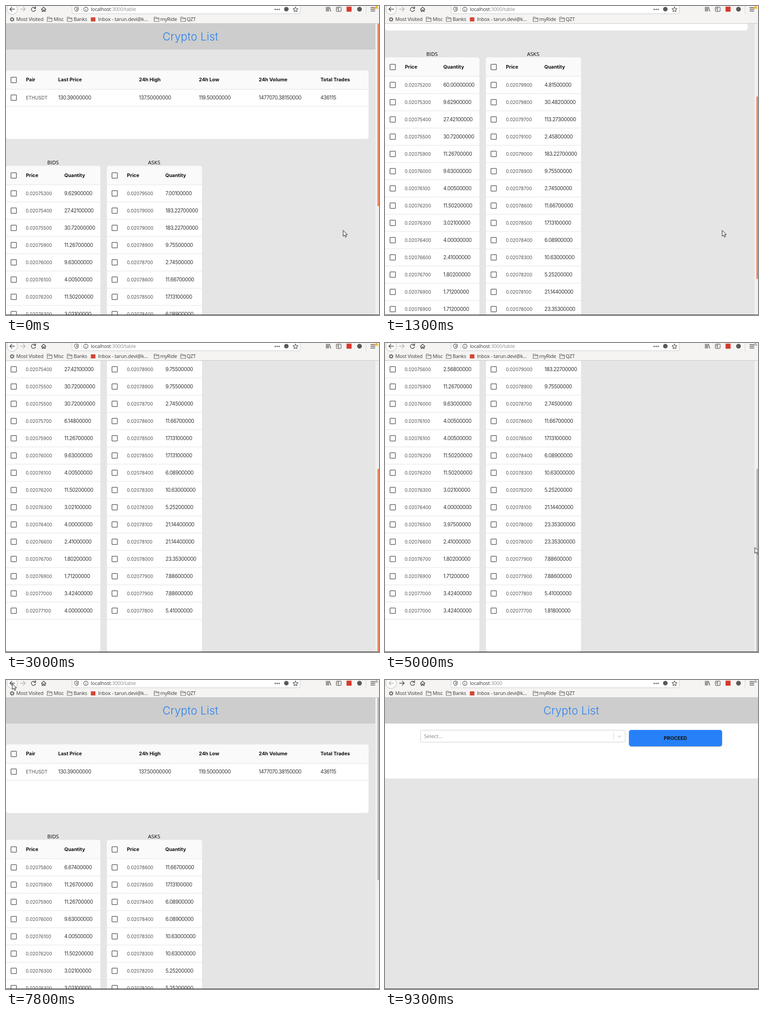
An HTML page for the animation above (9.4 s loop, 822 by 681 pixels).

```html
<!DOCTYPE html>
<html lang="en">
<head>
<meta charset="utf-8">
<title>Crypto List</title>
<style>
  html, body { margin: 0; width: 100%; height: 100%; overflow: hidden; background: #e5e5e5; }
  #stage { display: block; width: 822px; height: 681px; }
  text { white-space: pre; }
  .ui { font: 11px "Open Sans", "Noto Sans", sans-serif; letter-spacing: -.23px; fill: #3a3a3a; }
  .dim { fill: #8d8d8d; }
  .label { font: 11.5px "Open Sans", "Noto Sans", sans-serif; fill: #000; }
  .title { font: 300 24px Inter, sans-serif; letter-spacing: .2px; fill: #2a80f0; text-anchor: middle; }
  .head { font: 700 10.8px Inter, sans-serif; fill: #111; }
  .key { font: 10px Inter, sans-serif; letter-spacing: .04px; fill: #4c4c4c; }
  .val { font: 11.2px Inter, sans-serif; letter-spacing: -.4px; fill: #333; }
  .line { fill: #e1e1e1; }
  .box { fill: none; stroke: #666; stroke-width: 1.5; }
  .icon { fill: none; stroke: #4a4a4a; stroke-width: 1.4; stroke-linecap: round; stroke-linejoin: round; }
  .off { opacity: .38; }
</style>
</head>
<body>
<svg id="stage" viewBox="0 0 822 681">
  <rect width="822" height="681" fill="#e5e5e5"/>

  <svg id="table" y="39" width="822" height="642" viewBox="0 39 822 642">
    <g id="scroll">
      <rect y="38" width="814" height="58" fill="#cdcdcd"/>
      <text class="title" x="406.5" y="76">Crypto List</text>
      <g id="summary"></g>
      <text class="label" x="91" y="349">BIDS</text>
      <text class="label" x="313" y="349">ASKS</text>
      <g id="frames"></g>
      <g id="bids"></g>
      <g id="asks" transform="translate(223)"></g>
    </g>
    <rect x="814" y="39" width="8" height="642" fill="#f1f0ef"/>
    <rect id="thumb" x="818.5" y="39" width="3.5" height="402"/>
  </svg>

  <g id="picker">
    <rect y="39" width="822" height="57" fill="#cdcdcd"/>
    <text class="title" x="410.5" y="76">Crypto List</text>
    <path d="M0 96H822V212Q822 217 817 217H5Q0 217 0 212Z" fill="#fff"/>
    <rect x="78.5" y="110.5" width="451" height="26.5" rx="3" fill="#fff" stroke="#ccc"/>
    <text class="label" x="86" y="128" style="fill:#808080">Select...</text>
    <rect x="503" y="116" width="1" height="15" fill="#ccc"/>
    <path d="M513 122.5l3.5 3.5 3.5-3.5" fill="none" stroke="#ccc" stroke-width="1.6"/>
    <rect x="538" y="112" width="205" height="36" rx="5" fill="#000" opacity=".1"/>
    <rect x="538" y="111" width="205" height="36" rx="5" fill="#000" opacity=".2"/>
    <rect x="537.5" y="110" width="205.5" height="36" rx="5" fill="#2780f8"/>
    <text class="head" x="640" y="132" text-anchor="middle">PROCEED</text>
  </g>

  <g id="chrome">
    <rect width="822" height="39" fill="#f5f4f2"/>
    <rect y="38" width="822" height="1" fill="#c9c7c5"/>
    <circle cx="13.5" cy="7" r="11.7" fill="#fbfbfa" stroke="#bcbab7"/>
    <g class="icon">
      <path id="back" d="M19 7H8.5M13 2.5L8.5 7l4.5 4.5"/>
      <path id="forward" d="M32 7h10.5M38 2.5L42.5 7 38 11.5"/>
      <path d="M64.5 5A4.6 4.6 0 1 0 65 8.5M65.3 1.5V5.4H61.4"/>
      <path d="M78 7.5L83 2.5l5 5M79.5 7v5h2.3V8.7h2.4V12h2.3V7"/>
    </g>
    <rect x="145.5" y="-6" width="503" height="23" rx="3" fill="#fff" stroke="#cbc9c6"/>
    <rect x="166" y="1" width="1" height="13" fill="#d5d3d1"/>
    <g class="icon" style="stroke-width:1.1">
      <path d="M155.5 2.2L159.5 3.5V7Q159.5 10.5 155.5 12.3Q151.5 10.5 151.5 7V3.5Z"/>
      <path d="M155.5 4.5V10Q157.4 9 157.4 7V5Z" fill="#4a4a4a" stroke="none"/>
      <circle cx="176" cy="7.3" r="4.7"/><path d="M176 6.8v3M176 4.7v.1"/>
      <path d="M638 2l1.6 3.6 3.9.4-2.9 2.6.8 3.9-3.4-2-3.4 2 .8-3.9-2.9-2.6 3.9-.4z"/>
      <path d="M706 2.5v9M708.5 2.5v9M711 2.5v9M713 2.7l2.7 8.8" style="stroke-width:1.3"/>
      <rect x="728" y="2.5" width="10.5" height="9.5" rx="1.5"/><path d="M733 2.5V12M730 5h1.3M730 7h1.3"/>
      <path d="M804 3.5h9M804 7.3h9M804 11h9" style="stroke-width:1.4"/>
    </g>
    <text class="ui" x="187" y="11">localhost<tspan class="dim" id="path"></tspan></text>
    <g fill="#5a5a5a">
      <circle cx="593.3" cy="7.5" r="1.5"/><circle cx="597.6" cy="7.5" r="1.5"/><circle cx="601.9" cy="7.5" r="1.5"/>
      <circle cx="617.8" cy="7" r="5"/>
      <circle cx="779" cy="7" r="5.2"/>
    </g>
    <rect x="750.5" y="1.5" width="11" height="11" fill="#d8372b"/>
    <rect x="793" width="1" height="19" fill="#dad8d6"/>
    <path id="badge" d="M816.5-3L821 6H812Z"/>
    <g class="icon">
      <circle cx="13.5" cy="29.5" r="3"/>
      <circle cx="13.5" cy="29.5" r="4.4" stroke-dasharray="1.3 2.15" stroke-linecap="butt"/>
    </g>
    <rect x="187" y="25" width="10" height="9" fill="#d54637"/>
    <g id="marks"></g>
  </g>

  <rect y="680" width="822" height="1" fill="#2b2b2b"/>
  <path id="cursor" d="M0 0V13L3 10.3 5.2 15 7.3 14 5.2 9.5H9.3Z" fill="#fff" stroke="#111" stroke-linejoin="round"/>
</svg>

<script>
const LOOP = 9400, STEP = 100, ROWS = 15, ROW_H = 38, TOP = 394, MAX_SCROLL = 355;
const $ = id => document.getElementById(id);

const text = (cls, x, y, s) => `<text class="${cls}" x="${x}" y="${y}">${s}</text>`;
const line = (x, y, w) => `<rect class="line" x="${x}" y="${y}" width="${w}" height="1"/>`;
const check = (x, y) => `<rect class="box" x="${x + 11}" y="${y - 6}" width="12" height="12" rx="1"/>`;
const card = (x, y, w, h) =>
  `<rect x="${x}" y="${y}" width="${w}" height="${h}" rx="5" fill="#fff"/>
   <path d="M${x} ${y + 41}V${y + 5}q0-5 5-5h${w - 10}q5 0 5 5v36z" fill="#fafafa"/>
   ${line(x, y + 41, w)}${check(x, y + 21)}`;

// Static page parts
const columns = [
  [44, 'Pair', 'ETHUSDT'], [115, 'Last Price', '130.39000000'], [293, '24h High', '137.50000000'],
  [425, '24h Low', '119.50000000'], [557, '24h Volume', '1477070.38150000'], [693, 'Total Trades', '436115']
];
$('summary').innerHTML = card(0, 142, 799, 151) + check(0, 202) + line(0, 220.5, 799) +
  columns.map(([x, head, val], i) =>
    text('head', x, 166, head) + text(i ? 'val' : 'key', x, 206, val)).join('');

const frame = (x, w) => {
  let s = card(x, 352.5, w, 683) + text('head', x + 44, 377, 'Price') + text('head', x + 128.5, 377, 'Quantity');
  for (let i = 0; i < ROWS; i++) {
    const y = TOP + i * ROW_H;
    s += check(x, y + 19) + line(x, y + ROW_H - .5, w);
  }
  return s;
};
$('frames').innerHTML = frame(0, 208) + frame(222.5, 209.5);

const folder = x => `<path class="icon" style="stroke-width:1.1;stroke:#666" d="M${x} 34v-9.5h4l1.5 1.8h5V34zM${x} 28h10.5"/>`;
$('marks').innerHTML = [91, 135, 326.5, 385].map(folder).join('') +
  [[22.5, 'Most Visited'], [105, 'Misc'], [149, 'Banks'], [203, 'Inbox - tarun.devi@k…'], [340, 'myRide'], [398, 'QZT']]
    .map(([x, s]) => text('ui', x, 33, s)).join('');

// Standing orders, price:quantity
const book = s => s.split(' ').map(p => p.split(':').map(Number));
const bidBook = book('752:60 753:9.629 754:27.421 755:30.72 759:11.267 760:9.63 761:4.005 762:11.502 ' +
  '763:3.021 764:4 766:2.41 767:1.802 769:1.712 770:3.424 771:4');
const askBook = book('799:4.815 798:30.482 797:113.273 791:2.458 790:183.227 789:9.755 787:2.745 786:11.667 ' +
  '785:17.131 784:6.089 783:10.63 782:5.252 781:21.144 780:23.353 779:7.886');

// Each update: time, then per side the best standing price and any extra orders
const updates = [
  [0, '753', '790 795 790'],
  [900, '752 769', '799'],
  [1600, '753', '791'],
  [2500, '755 754 755 757', '789 789 785 781 779'],
  [4000, '755', '789'],
  [4500, '759 756 761 762 765 770', '790 780 779'],
  [5300, '754', '789'],
  [6400, '753 756 759', '787 784 783'],
  [7600, '759 758 759 763', '786 784 783 782']
];

// Seeded quantity for prices that the book does not hold
const randomQty = price => {
  const r = Math.sin(price * 12.9898) * 43758.5453;
  return 1 + 9 * (r - Math.floor(r));
};

function fill(id, orders, dir, spec) {
  const [best, ...extra] = spec.split(' ').map(Number);
  const add = price => [price, (orders.find(o => o[0] === price) || [0, +randomQty(price).toFixed(3)])[1]];
  const list = orders.filter(o => dir * (o[0] - best) >= 0).concat(extra.map(add));
  list.sort((a, b) => dir * (a[0] - b[0]));
  while (list.length < ROWS) list.push(add(list[list.length - 1][0] + dir));
  $(id).innerHTML = list.slice(0, ROWS).map(([price, qty], i) => {
    const y = TOP + 23 + i * ROW_H;
    return text('key', 43.5, y, `0.020${price}00`) + text('val', 128.5, y, qty.toFixed(8));
  }).join('');
}

// Legs: first step, last step, then the point reached
const scrollLegs = [[1200, 1300, 239], [1400, 1400, MAX_SCROLL], [6600, 6600, 133], [7000, 7100, 0]];
const cursorLegs = [
  [2500, 3000, 840, 514], [4000, 4000, 819, 515], [5000, 5000, 815, 450.5], [5300, 5400, 735, 460],
  [5700, 5900, 723, 468], [7000, 7100, 124, 99], [7300, 7400, 69, 38], [7600, 7800, 14, 8],
  [8300, 8500, 27, 15], [8800, 8800, 60, 2], [9000, 9100, 51, -40]
];

function travel(from, legs, t) {
  const now = Math.floor(t / STEP) * STEP;
  return legs.reduce((pos, [first, last, ...to]) => {
    const p = Math.min(1, Math.max(0, (now - first + STEP) / (last - first + STEP)));
    return pos.map((v, i) => v + (to[i] - v) * p);
  }, from);
}

let shown;
function draw(t) {
  const update = updates.filter(u => u[0] <= t).pop();
  if (update !== shown) {
    shown = update;
    fill('bids', bidBook, 1, update[1]);
    fill('asks', askBook, -1, update[2]);
  }
  const [y] = travel([0], scrollLegs, t);
  const left = t >= 8300, active = t < 4700 || (left && t < 9300);
  $('scroll').setAttribute('transform', `translate(0 ${-y})`);
  $('thumb').setAttribute('y', 39 + y * 238.5 / MAX_SCROLL);
  $('thumb').setAttribute('fill', active ? '#ee8861' : '#b9b7b5');
  $('badge').setAttribute('fill', active ? '#fcb827' : '#bdbbb9');
  $('cursor').setAttribute('transform', `translate(${travel([743, 494.5], cursorLegs, t)})`);
  $('table').style.display = left ? 'none' : '';
  $('picker').style.display = left ? '' : 'none';
  $('back').classList.toggle('off', left);
  $('forward').classList.toggle('off', !left);
  $('path').textContent = left ? ':3000' : ':3000/table';
}

const start = performance.now();
function tick() {
  draw((performance.now() - start) % LOOP);
  requestAnimationFrame(tick);
}
tick();
</script>
</body>
</html>
```
